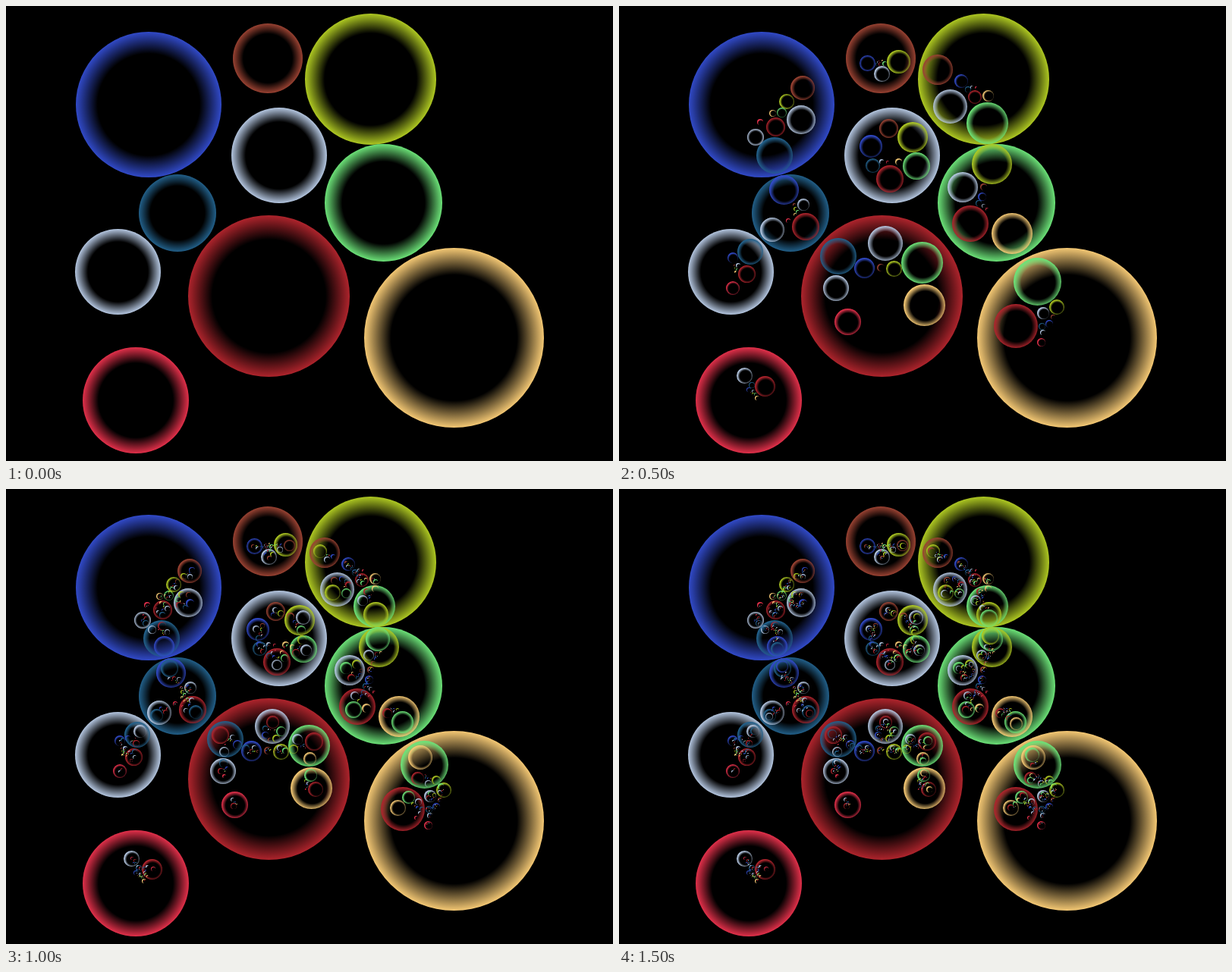
Animation of 800 by 600 pixels, one loop 2000 ms. Source, as an HTML page with a canvas:

```html
<!DOCTYPE html>
<html lang="en">
<head>
<meta charset="utf-8">
<title>Circle inversions</title>
<style>
  html, body { margin: 0; width: 100%; height: 100%; overflow: hidden; background: #000; }
  canvas { display: block; }
</style>
</head>
<body>
<canvas id="stage" width="800" height="600"></canvas>
<script>
const WIDTH = 800, HEIGHT = 600;
const STEP = 500, DEPTHS = 4;
const INNER = 0.7; // share of the radius that stays clear

const circle = (x, y, r, rgb) => ({ x, y, r, rgb });
const mirrors = [
  circle(188, 130, 96, '49,74,200'),
  circle(345, 69, 46, '154,66,50'),
  circle(480.5, 96.5, 86.5, '174,200,34'),
  circle(360, 197, 63, '180,198,224'),
  circle(497.5, 259.5, 77.5, '108,226,120'),
  circle(226, 273, 51, '34,96,138'),
  circle(346.5, 382.5, 106.5, '174,36,44'),
  circle(147.5, 350.5, 56.5, '180,198,224'),
  circle(590.5, 437.5, 118.5, '244,200,116'),
  circle(171, 520, 70, '226,48,74')
];
mirrors.forEach(m => { m.owner = m; });

function invert(c, mirror) {
  const dx = c.x - mirror.x, dy = c.y - mirror.y;
  const scale = mirror.r ** 2 / (dx * dx + dy * dy - c.r ** 2);
  return {
    x: mirror.x + dx * scale,
    y: mirror.y + dy * scale,
    r: c.r * scale,
    rgb: c.rgb,
    owner: mirror
  };
}

// Each generation reflects the last one into every circle that does not hold it.
const nextGeneration = circles => mirrors.flatMap(m =>
  circles.filter(c => c.owner !== m).map(c => invert(c, m)));

// The outline snaps to whole pixels while the shading keeps its exact centre.
function drawRing(ctx, { x, y, r, rgb }) {
  const size = Math.floor(2 * r + 1e-6);
  if (size < 1) return;
  const half = size / 2;
  const shade = ctx.createRadialGradient(x, y, 0, x, y, r);
  shade.addColorStop(INNER, `rgba(${rgb},0)`);
  shade.addColorStop(1, `rgb(${rgb})`);
  ctx.fillStyle = shade;
  ctx.beginPath();
  ctx.arc(Math.floor(x - r + 1e-6) + half, Math.floor(y - r + 1e-6) + half, half, 0, 2 * Math.PI);
  ctx.fill();
}

function buildLayers() {
  const layers = [];
  let circles = mirrors;
  for (let depth = 0; depth < DEPTHS; depth++) {
    const layer = document.createElement('canvas');
    layer.width = WIDTH;
    layer.height = HEIGHT;
    const ctx = layer.getContext('2d');
    if (depth) {
      ctx.drawImage(layers[depth - 1], 0, 0);
      circles = nextGeneration(circles);
    } else {
      ctx.fillRect(0, 0, WIDTH, HEIGHT);
    }
    circles.forEach(c => drawRing(ctx, c));
    layers.push(layer);
  }
  return layers;
}

const layers = buildLayers();
const stage = document.getElementById('stage').getContext('2d');
let start = null;

function render(now) {
  start ??= now;
  const depth = Math.floor((now - start) / STEP) % DEPTHS;
  stage.drawImage(layers[depth], 0, 0);
  requestAnimationFrame(render);
}
stage.drawImage(layers[0], 0, 0);
requestAnimationFrame(render);
</script>
</body>
</html>
```
